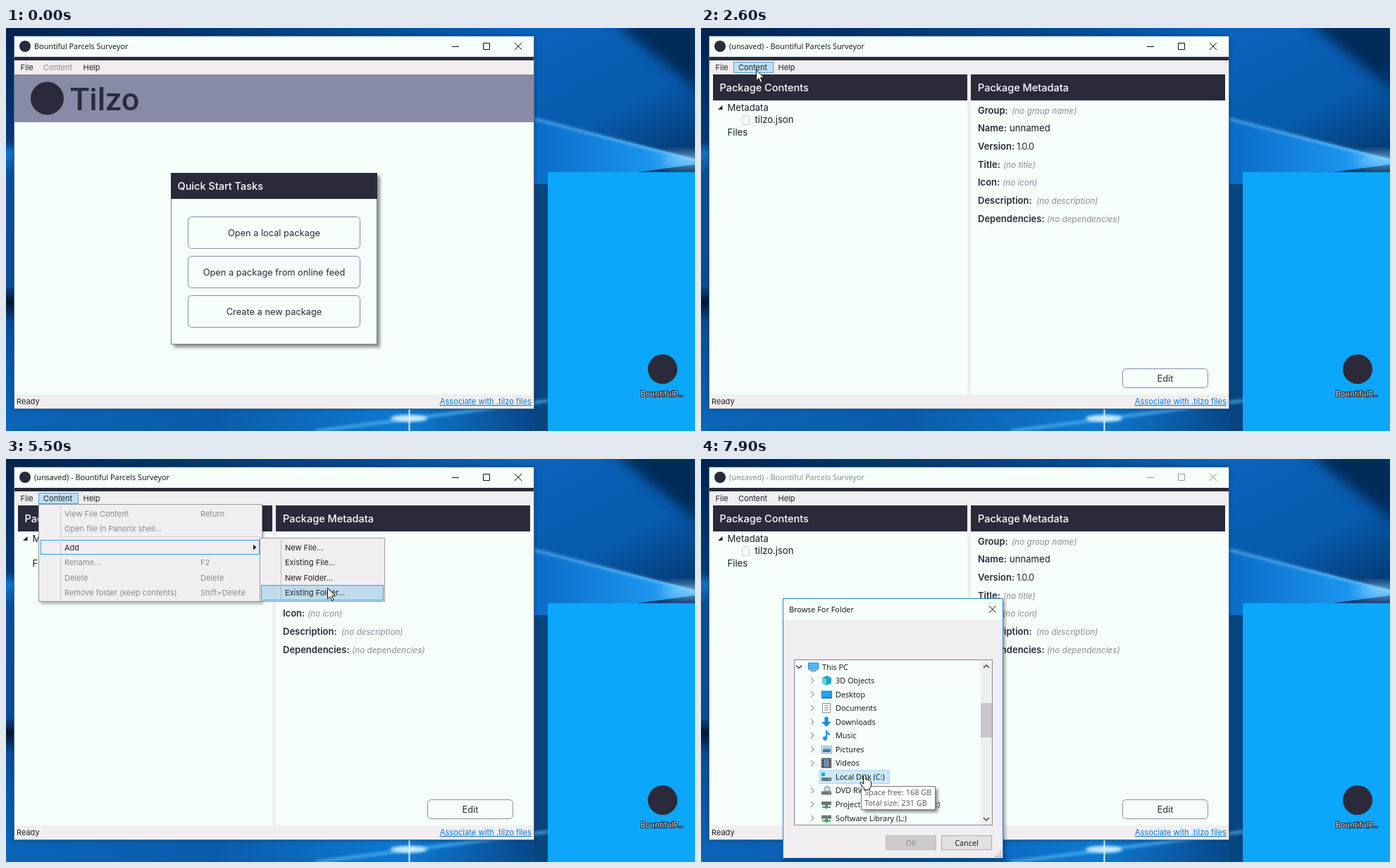
Recreate the animation shown at these times as an HTML page. Size 978 by 573 pixels, loop 8000 ms.

```html
<!DOCTYPE html>
<html lang="en">
<head>
<meta charset="utf-8">
<title>Package tool demo</title>
<style>
  html, body { margin: 0; width: 100%; height: 100%; overflow: hidden; background: #06427f; }
  svg { display: block; width: 978px; height: 573px; }
  text { font-family: Inter, sans-serif; fill: #2b2a3a; white-space: pre; }
  .os { font: 10.9px "Open Sans", sans-serif; fill: #111; }
  .menu { font-size: 11px; fill: #222; }
  .off { fill: #8c8a8e; }
  .head { font-size: 14.5px; font-weight: 500; fill: #fff; }
  .btn { font-size: 12.8px; text-anchor: middle; }
  .tree { font-size: 13.1px; fill: #1c1b26; }
  .num { font-size: 12.8px; letter-spacing: -.7px; }
  .key { font-size: 13px; font-weight: 600; }
  .none { font-size: 11.7px; font-style: italic; fill: #8c8b9c; }
  .link { font-size: 11.2px; fill: #0a78d4; text-anchor: end; text-decoration: underline; }
  .brand { font: 500 45px Roboto, sans-serif; fill: #2b2b3b; }
  .white { fill: #fff; }
  .tip { fill: #575757; }
  .mid { text-anchor: middle; }
  .icon { fill: #fff; stroke: #123; stroke-width: 2px; paint-order: stroke; }
</style>
</head>
<body>
<svg id="stage" viewBox="0 0 978 573"></svg>
<script>
const LOOP = 8000;
const DARK = '#2a2a3a', PAPER = '#f6fff9', GREY = '#f0eef0', APP = 'Bountiful Parcels Surveyor';

const rect = (x, y, w, h, fill, more = '') =>
  `<rect x="${x}" y="${y}" width="${w}" height="${h}" fill="${fill}" ${more}/>`;
const box = (x, y, w, h, fill, stroke, more = '') =>
  rect(x + .5, y + .5, w - 1, h - 1, fill, `stroke="${stroke}" ${more}`);
const path = (d, fill, stroke = 'none', more = '') =>
  `<path d="${d}" fill="${fill}" stroke="${stroke}" ${more}/>`;
const dot = (x, y, r, fill) => `<circle cx="${x}" cy="${y}" r="${r}" fill="${fill}"/>`;
const text = (x, y, s, cls) => `<text x="${x}" y="${y}" class="${cls}">${s}</text>`;
const during = (from, to, body) => `<g data-from="${from}" data-to="${to}">${body}</g>`;
const ramp = (id, dir, stops) => `<linearGradient id="${id}" ${dir}>` +
  stops.map(([o, c]) => `<stop offset="${o}" stop-color="${c}"/>`).join('') + '</linearGradient>';

function wallpaper() {
  return `<defs>
    <filter id="soft" x="-20%" y="-20%" width="140%" height="140%"><feGaussianBlur stdDeviation="2"/></filter>
    <filter id="haze" x="-50%" y="-100%" width="200%" height="300%"><feGaussianBlur stdDeviation="9"/></filter>` +
    ramp('left', 'x2="0" y2="1"', [[0, '#01234f'], [.28, '#043a76'], [.31, '#1473c8'], [.36, '#0a5099'],
      [.64, '#0a4d94'], [.68, '#02152f'], [.73, '#084d95'], [1, '#0b66ba']]) +
    ramp('top', '', [[0, '#01234f'], [.5, '#04498b'], [.8, '#0a66c0'], [1, '#053468']]) +
    ramp('base', '', [[0, '#0a64b8'], [.3, '#0a5caa'], [.58, '#0d7ad2'], [.76, '#08498c'], [1, '#08498c']]) +
    ramp('sky', 'x2=".5" y2="1"', [[0, '#0a63bb'], [.6, '#075aad'], [1, '#04396f']]) +
    ramp('beam', '', [[0, '#0a6cc8'], [1, '#22a4fb']]) + '</defs>' +
    rect(0, 0, 978, 573, 'url(#base)') + rect(0, 0, 12, 573, 'url(#left)') +
    rect(0, 0, 978, 12, 'url(#top)') + rect(750, 0, 228, 240, 'url(#sky)') +
    path('M860 -10L990 -10V95Z', '#032a58', 'none', 'filter="url(#haze)"') +
    path('M750 129L978 186V194L770 222L750 224Z', 'url(#beam)') +
    path('M750 129L978 188', 'none', '#8fd4ff', 'stroke-width="2" filter="url(#soft)"') +
    `<ellipse cx="970" cy="188" rx="40" ry="6" fill="#b5e5ff" filter="url(#haze)"/>` +
    rect(750, 222, 19, 351, '#07467f') +
    rect(769, 205, 368, 368, '#0ca6fa') +
    path('M440 573L572 556L769 530', 'none', '#5cc0ff', 'stroke-width="3" filter="url(#soft)"') +
    `<ellipse cx="572" cy="555" rx="26" ry="5" fill="#c8ecff" filter="url(#soft)"/>` +
    path('M572.5 541V573', 'none', '#d5f0ff', 'stroke-width="2"') +
    dot(932, 485, 21, DARK) + text(931, 524, 'BountifulP...', 'os mid icon');
}

const titleButtons = (color) =>
  path('M633 26.5H643M677.5 21.5H686.5V30.5H677.5ZM722 21L732 31M732 21L722 31', 'none', color);

function frame() {
  const unsaved = text(40, 30, `(unsaved) - ${APP}`, 'os');
  return rect(10, 10, 741, 533, '#001c3c', 'opacity=".3" filter="url(#soft)"') +
    box(11, 11, 739, 531, PAPER, '#4d6f92') +
    rect(12, 41, 737, 5, DARK) + rect(12, 46, 737, 20, GREY) + rect(12, 521, 737, 20, GREY) +
    dot(27, 26, 8, DARK) +
    during(0, 2000, text(40, 30, APP, 'os')) + during(2000, 6200, unsaved) +
    during(0, 6200, titleButtons('#111')) +
    during(6200, LOOP, `<g opacity=".5">${unsaved}</g>` + titleButtons('#999')) +
    during(2600, 6000, box(46, 48, 57, 16, '#c0dff3', '#4ba4e0')) +
    text(20.5, 60, 'File', 'menu') + text(109.5, 60, 'Help', 'menu') +
    during(0, 2000, text(53, 60, 'Content', 'menu off')) +
    during(2000, LOOP, text(53, 60, 'Content', 'menu')) +
    text(15, 535, 'Ready', 'menu') + text(746, 535, 'Associate with .tilzo files', 'link');
}

function button(x, y, w, h, label, hover) {
  return box(x, y, w, h, hover ? '#b9b8c0' : PAPER, hover ? '#b9b8c0' : '#8b89ac', 'rx="5"') +
    text(x + w / 2, y + h / 2 + 4.5, label, hover ? 'btn white' : 'btn');
}

function home() {
  const tasks = ['Open a local package', 'Open a package from online feed', 'Create a new package'];
  return rect(12, 66, 737, 68, '#888ba5') + dot(58.5, 100, 23.5, DARK) + text(91, 117, 'Tilzo', 'brand') +
    rect(238, 210, 293, 244, '#555', 'opacity=".65" filter="url(#soft)"') +
    box(234, 206, 293, 244, PAPER, '#777993') + rect(234, 206, 293, 37, DARK) +
    text(243.5, 230, 'Quick Start Tasks', 'head') +
    tasks.map((s, i) => button(258, 268 + 56 * i, 245, 46, s)).join('') +
    during(1300, 2000, button(258, 380, 245, 46, tasks[2], true));
}

function editor() {
  const meta = [['Group', 441, '(no group name)', 'none'], ['Name', 438, 'unnamed', 'tree'],
    ['Version', 448, '1.0.0', 'num'], ['Title', 429, '(no title)', 'none'], ['Icon', 428, '(no icon)', 'none'],
    ['Description', 476, '(no description)', 'none'], ['Dependencies', 491, '(no dependencies)', 'none']];
  return rect(378, 66, 5, 455, GREY) +
    rect(17, 66, 361, 37, DARK) + text(26.5, 90, 'Package Contents', 'head') +
    rect(383, 66, 361, 37, DARK) + text(393, 90, 'Package Metadata', 'head') +
    path('M30.5 110V116H24Z', '#222') +
    path('M58.5 124.5H66L68.5 127V137.5H58.5Z', '#fdfafa', '#d5cdd0') +
    text(37.5, 117.5, 'Metadata', 'tree') + text(76.5, 135, 'tilzo.json', 'tree') + text(37.5, 152.5, 'Files', 'tree') +
    meta.map(([key, x, value, cls], i) => {
      const y = 121.5 + 25.7 * i;
      return text(393, y, key + ':', 'key') + text(x, y, value, cls);
    }).join('') +
    button(598, 484, 122, 28, 'Edit');
}

function menus() {
  const items = [[81.5, 'View File Content', 'Return'], [103, 'Open file in Panorix shell...', ''], [151, 'Rename...', 'F2'],
    [172.5, 'Delete', 'Delete'], [194, 'Remove folder (keep contents)', 'Shift+Delete']];
  const marked = (w) => box(49, 115, w, 21, GREY, '#2a9fdc');
  const pick = (i) => box(362, 115 + 21.4 * i, 174, 22, '#bfdcec', '#35a0dc');
  const sub = box(360, 112, 178, 91, GREY, '#9b9a9e') +
    during(5100, 5300, pick(1)) + during(5300, 5500, pick(2)) + during(5500, 6000, pick(3)) +
    path('M390.5 115V201', 'none', '#b9b8bc') +
    ['New File...', 'Existing File...', 'New Folder...', 'Existing Folder...']
      .map((s, i) => text(396, 129.5 + 21.5 * i, s, 'menu')).join('');
  return rect(49, 67, 317, 139, '#000', 'opacity=".3" filter="url(#soft)"') +
    box(46, 64, 318, 139, GREY, '#9b9a9e') +
    path('M80 110.5H361', 'none', '#cfcdd1') +
    during(3800, 4300, marked(312)) + during(4300, 6000, marked(311)) +
    path('M77.5 67V200', 'none', '#cfcdd1') +
    items.map(([y, s, key]) => text(83, y, s, 'menu off') + text(276, y, key, 'menu off')).join('') +
    text(83, 129.5, 'Add', 'menu') + path('M351 121.5L355.5 125.5L351 129.5Z', '#222') +
    during(4300, 6000, sub);
}

const slab = rect(-7, 1, 14, 5, '#70757b') + rect(3, 3, 2, 1, '#5fe06a');
const icons = {
  desk: rect(-7, -5, 15, 11, '#1478cc') + rect(-6, -4, 13, 8, '#25a2f2'),
  cloud: dot(0, 0, 6.5, '#1272cc'),
  user: dot(0, -3, 3.5, '#b98b62') + path('M-6 7Q-5 0 0 1Q6 0 6 7Z', '#3f8068'),
  pc: rect(-7, -6, 15, 10, '#1b87d6') + rect(-6, -5, 13, 8, '#4fb7f5') + rect(-4, 5, 9, 1.5, '#60747f'),
  libs: rect(-7, -6, 13, 12, '#ffd766') + rect(-4, -1, 5, 7, '#45b05c') + rect(2, -1, 5, 7, '#3c9be0'),
  net: rect(-3, -7, 10, 8, '#53a8e4') + rect(-7, -3, 11, 8, '#1679c8') + rect(-3, 5, 4, 2, '#60747f'),
  panel: box(-7, -6, 15, 12, '#4ba9e8', '#1a70b4') + dot(-3, 0, 2.5, '#fff') + rect(2, -3, 4, 2, '#fff') + rect(2, 1, 4, 2, '#ffd766'),
  bin: path('M-5.5 -6H5.5L4 7H-4Z', '#dfe9ee', '#7d8b99') + dot(0, 1, 2.5, '#3288cc'),
  folder: rect(-6, -7, 12, 14, '#f7cf62') + rect(-4, -5, 10, 12, '#ffe08a'),
  cube: path('M-6 -4L1 -7L7 -4V4L0 7L-6 4Z', '#21a5c9') + path('M-6 -4L0 -2V7L-6 4Z', '#64d0e6'),
  doc: box(-6, -7, 12, 14, '#fff', '#7d8b99') + path('M-3 -3.5H3M-3 -.5H3M-3 2.5H3', 'none', '#5a87ad'),
  down: path('M-2.5 -7H2.5V0H7L0 7L-7 0H-2.5Z', '#1e86dc'),
  note: path('M0 4V-7Q1 -3 5 -1', 'none', '#159be6', 'stroke-width="2"') + dot(-2, 4, 3, '#159be6'),
  pic: box(-7, -5, 15, 11, '#fff', '#8a98a5') + rect(-5, -3, 11, 3, '#7cc4ee') + rect(-5, 0, 11, 4, '#3a7b9b'),
  film: rect(-7, -7, 14, 14, '#333') + rect(-4, -6, 8, 12, '#6c8fae') +
    path('M-5.5 -6V6M5.5 -6V6', 'none', '#ddd', 'stroke-dasharray="2 1.5"'),
  disk: rect(-7, -6, 5, 5, '#1ca4ec') + slab,
  dvd: dot(1, -2, 5, '#b9bec4') + dot(1, -2, 1.5, '#fff') + slab,
  share: rect(-7, -4, 14, 5, '#70757b') + rect(-6, 3, 12, 2, '#36a845') + rect(-2, 1, 4, 5, '#36a845')
};

function row(i, [kind, label, chevron], x) {
  const y = 295.5 + 19.55 * i;
  const arrow = chevron === 'v' ? `M${x - 37} ${y - 2}l4 4l4 -4` : `M${x - 35} ${y - 4}l4 4l-4 4`;
  return `<g transform="translate(${x - 13} ${y})">${icons[kind]}</g>` +
    (chevron ? path(arrow, 'none', chevron === 'v' ? '#333' : '#9a9a9a', 'stroke-width="1.2"') : '') +
    text(x, y + 4, label, 'os');
}
const mark = (i, x, w, fill = '#e3f3ff') => rect(x, 286 + 19.55 * i, w, 19, fill);

function scrollbar(top, height) {
  return rect(397, 286, 16, 234, GREY) + rect(397, top, 16, height, '#c9c8cc') +
    path('M401 297l4 -4l4 4M401 510l4 4l4 -4', 'none', '#444', 'stroke-width="1.5"');
}

function dialog() {
  const roots = [['cloud', 'HazeDisk - Talvo', '>'], ['user', 'Dorin Paley', '>'], ['pc', 'This PC', '>'],
    ['libs', 'Libraries', '>'], ['net', 'Network', '>'], ['panel', 'Control Panel', '>'], ['bin', 'Recycle Bin'],
    ['folder', 'QB Spring Meetup', '>'], ['folder', 'QB-FastLinks', '>'], ['folder', 'New folder'], ['folder', 'NuGet Training', '>']];
  const drives = [['cube', '3D Objects', '>'], ['desk', 'Desktop', '>'], ['doc', 'Documents', '>'], ['down', 'Downloads', '>'],
    ['note', 'Music', '>'], ['pic', 'Pictures', '>'], ['film', 'Videos', '>'], ['disk', 'Local Disk (C:)'],
    ['dvd', 'DVD RW Drive (D:)', '>'], ['share', 'Project Archive on Storage (I:)', '>'], ['share', 'Software Library (L:)', '>']];
  const list = (items, x) => items.map((it, i) => row(i + 1, it, x)).join('');
  const push = (x, label, fill, stroke, w, cls) =>
    rect(x + w / 2, 535 + w / 2, 72 - w, 21 - w, fill, `stroke="${stroke}" stroke-width="${w}"`) +
    text(x + 36, 549.5, label, 'os mid ' + cls);
  const tip = rect(231, 469, 105, 33, '#000', 'opacity=".45" filter="url(#soft)"') +
    box(227, 465, 106, 34, '#fff', '#777') +
    text(232, 478, 'Space free: 168 GB', 'os tip') + text(232, 493, 'Total size: 231 GB', 'os tip');

  return rect(118, 201, 314, 371, '#000', 'opacity=".35" filter="url(#soft)"') +
    box(116, 198, 313, 370, GREY, '#2a84cc') + rect(117, 199, 311, 30, PAPER) +
    text(125, 218, 'Browse For Folder', 'os') +
    path('M409 209L418.5 218.5M418.5 209L409 218.5', 'none', '#111') +
    box(132, 285, 282, 236, PAPER, '#828790') +
    during(6400, 7200, mark(0, 150, 49, '#cce8ff') + during(6900, 7200, mark(3, 168, 47)) +
      row(0, ['desk', 'Desktop'], 153.5) + list(roots, 172) + scrollbar(303, 133)) +
    during(7200, LOOP, during(7200, 7900, mark(0, 150, 65, '#cce8ff')) + during(7200, 7500, mark(3, 168, 87)) +
      during(7500, 7700, mark(4, 168, 84)) + during(7700, 7900, mark(6, 168, 68)) +
      during(7900, LOOP, box(168, 442, 100, 20, '#cce8ff', '#a5d6fa')) +
      row(0, ['pc', 'This PC', 'v'], 172) + list(drives, 191) + scrollbar(347, 49)) +
    during(6200, 7200, push(262, 'OK', '#e1e0e2', '#0b7ad4', 2, '')) +
    during(7200, LOOP, push(262, 'OK', '#cccacd', '#bfbdc0', 1, 'off')) +
    push(341, 'Cancel', '#e1e0e2', '#adabae', 1, '') +
    path('M418 565H426M421 562H426M424 559H426', 'none', '#b0aeb2', 'stroke-width="2" stroke-dasharray="2 1"') +
    during(7900, LOOP, tip);
}

const pointers = {
  arrow: 'M.5 .5V16L4 12.6L6.5 18.5L9 17.5L6.5 11.7H11.5Z',
  hand: 'M5.5 2Q7 -.5 8.8 2V8Q10.8 6.8 11.8 8.7Q13.8 7.7 14.6 9.7Q16.5 9.5 16.5 11.5V16.5L14.5 20V22.5H6.5V20L1 13.5Q.5 11.3 2.5 11.5L5.5 14Z'
};
// time, shape, x, y
const moves = [
  [700, 'arrow', 859, 540], [1000, 'arrow', 612, 418], [1300, 'hand', 419, 401],
  [2200, 'arrow', 422, 381], [2400, 'arrow', 330, 250], [2500, 'arrow', 170, 130], [2600, 'arrow', 78, 59],
  [3500, 'arrow', 92, 132], [3800, 'arrow', 120, 121], [4800, 'arrow', 257, 127],
  [5100, 'arrow', 400, 145], [5300, 'arrow', 432, 166], [5500, 'arrow', 456, 183], [6000, 'arrow', 459, 187],
  [6600, 'arrow', 333, 214], [6900, 'hand', 200, 356], [7500, 'hand', 214, 382],
  [7700, 'hand', 219, 413], [7900, 'hand', 225, 448]
];

const stage = document.getElementById('stage');
stage.innerHTML = wallpaper() + frame() + during(0, 2000, home()) + during(2000, LOOP, editor()) +
  during(3100, 6000, menus()) + `<g id="dialog">${during(6200, LOOP, dialog())}</g>` +
  '<path id="cursor" fill="#fff" stroke="#111" stroke-linejoin="round"/>';

const layers = [...stage.querySelectorAll('[data-from]')]
  .map((el) => ({ el, from: +el.dataset.from, to: +el.dataset.to }));
const cursor = document.getElementById('cursor');
const popup = document.getElementById('dialog');

function render(t) {
  for (const { el, from, to } of layers) el.style.display = t >= from && t < to ? '' : 'none';
  popup.style.opacity = t < 6300 ? .5 : 1;
  const move = moves.filter(([at]) => at <= t).pop();
  cursor.style.display = move ? '' : 'none';
  if (move) {
    const [, shape, x, y] = move;
    cursor.setAttribute('d', pointers[shape]);
    cursor.setAttribute('transform', `translate(${x} ${y})`);
  }
}

const start = performance.now();
function tick() {
  render((performance.now() - start) % LOOP);
  requestAnimationFrame(tick);
}
tick();
</script>
</body>
</html>
```
